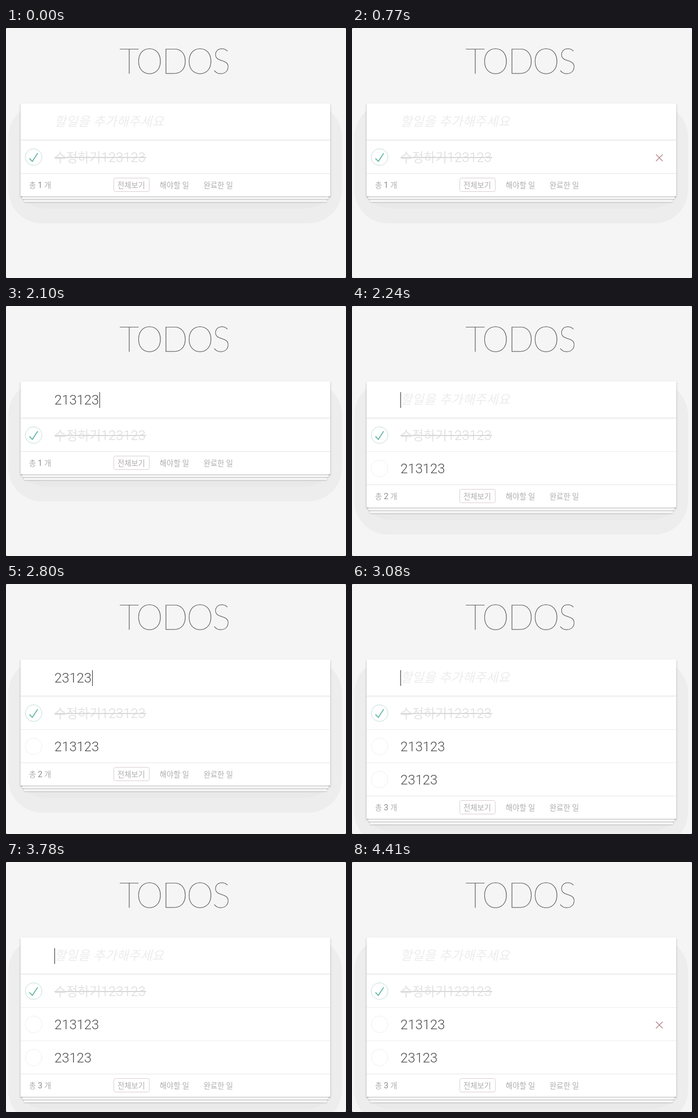
Recreate the animation shown at these times as an HTML page. Size 604 px wide and 444 px high, loop 4.55 s.

```html
<!DOCTYPE html>
<html lang="ko">
<head>
<meta charset="utf-8">
<title>TODOS</title>
<style>
html, body { margin: 0; width: 100%; height: 100%; overflow: hidden; background: #555; }
#stage { position: relative; width: 604px; height: 444px; overflow: hidden; background: #f5f5f5; border-radius: 2px; }
#glow, #glow::after, #card, svg { position: absolute; }
#glow { left: 4px; top: 134px; width: 593px; border-radius: 60px; background: #ededed; }
#glow::after { content: ""; inset: 60px 32px 26px; border-radius: 0 0 40px 40px / 0 0 16px 16px; background: #e9e9e9; }
#card {
  left: 26px; top: 134px; width: 550px; background: #fff;
  box-shadow: 0 1px 1px rgba(0,0,0,.2), 0 8px 0 -3px #f6f6f6, 0 9px 1px -3px rgba(0,0,0,.2),
    0 16px 0 -6px #f6f6f6, 0 17px 2px -6px rgba(0,0,0,.2), 0 2px 4px rgba(0,0,0,.2);
}
#head { height: 65px; box-shadow: inset 0 -2px 1px rgba(0,0,0,.03); }
svg { left: 0; top: 0; }
text { font-family: Roboto, "Noto Sans CJK KR", "Noto Sans CJK", sans-serif; white-space: pre; }
#title {
  font: 100 61px Lato, Inter, sans-serif; letter-spacing: -2.2px; text-anchor: middle;
  fill: #4d4d4d; stroke: #4d4d4d; stroke-width: .25px;
}
#hint { font: italic 100 22.7px "Noto Sans CJK KR", "Noto Sans CJK", sans-serif; fill: #ececec; }
.entry { font-size: 23.8px; font-weight: 300; fill: #4d4d4d; }
.done { fill: #d9d9d9; }
.ko { font-size: 22.5px; fill: #e2e2e2; }
#foot text { font-size: 13.3px; font-weight: 300; fill: #adadad; }
#count { font-size: 14.5px; font-weight: 400; fill: #8a8a8a; }
</style>
</head>
<body>
<div id="stage">
  <div id="glow"></div>
  <div id="card"><div id="head"></div></div>
  <svg width="604" height="444" viewBox="0 0 604 444">
    <text id="title" x="299" y="80.5">TODOS</text>
    <text id="hint" x="86" y="174">할일을 추가해주세요</text>
    <text id="field" class="entry" x="86" y="175"></text>
    <rect id="caret" y="153" width="1" height="28" fill="#333"/>
    <rect x="26" y="199" width="550" height="1" fill="#e6e6e6"/>
    <g id="rows"></g>
    <g id="foot">
      <rect x="26" width="550" height="1" fill="#e6e6e6"/>
      <text x="41" y="26">총 <tspan id="count"></tspan> 개</text>
      <rect x="191.5" y="8.5" width="63" height="24" rx="3" fill="none" stroke="#dccfd0"/>
      <text x="198" y="26">전체보기</text>
      <text x="273" y="26">해야할 일</text>
      <text x="351" y="26">완료한 일</text>
    </g>
    <path id="cross" d="M-6 -6L6 6M6 -6L-6 6" fill="none" stroke="#b07f83" stroke-width="1.1"/>
  </svg>
</div>
<script>
const LOOP = 4550, ROW = 59, LEFT = 86, DIGIT = 13.36;
const $ = id => document.getElementById(id);

// start time, row count, typed text, caret shown, row under the pointer (-1 for none)
const steps = [
  [0, 1, '', false, -1],
  [770, 1, '', false, 0],
  [1260, 1, '', false, -1],
  [1400, 1, '', true, -1],
  [1540, 1, '21', true, -1],
  [1680, 1, '213', true, -1],
  [1820, 1, '21312', true, -1],
  [1890, 1, '213123', true, -1],
  [2240, 2, '', true, -1],
  [2450, 2, '2', true, -1],
  [2520, 2, '23', true, -1],
  [2590, 2, '231', true, -1],
  [2660, 2, '2312', true, -1],
  [2730, 2, '23123', true, -1],
  [3080, 3, '', true, -1],
  [3290, 3, '', false, -1],
  [3500, 0, '', false, -1],
  [3640, 0, '', true, -1],
  [3780, 3, '', true, -1],
  [4130, 3, '', false, -1],
  [4410, 3, '', false, 1]
];

const items = [
  { label: '<tspan class="ko">수정하기</tspan>123123', done: true },
  { label: '213123' },
  { label: '23123' }
];

const rowMarkup = ({ label, done }, i) => `
  <g transform="translate(0 ${200 + ROW * i})">
    <g transform="translate(34.2 14.5) scale(.2963)">
      <circle cx="50" cy="50" r="50" fill="none" stroke="${done ? '#bddad5' : '#ededed'}" stroke-width="3"/>
      ${done ? '<path fill="#62b5a4" d="M72 25L42 71 27 56l-4 4 20 20 34-52z"/>' : ''}
    </g>
    <text class="entry ${done ? 'done' : ''}" x="${LEFT}" y="38">${label}</text>
    ${done ? `<rect x="${LEFT}" y="29" width="163" height="2" fill="#d9d9d9"/>` : ''}
    <rect x="26" y="58" width="550" height="1" fill="#ededed"/>
  </g>`;

$('rows').innerHTML = items.map(rowMarkup).join('');
const rows = [...$('rows').children];
const show = (el, on) => { el.style.display = on ? '' : 'none'; };

function render([, count, typed, caret, hover]) {
  const top = 200 + ROW * count - (count ? 1 : 0);
  $('card').style.height = top + 41 - 134 + 'px';
  $('glow').style.height = top + 89 - 134 + 'px';
  $('foot').setAttribute('transform', `translate(0 ${top})`);
  $('count').textContent = count;
  rows.forEach((row, i) => show(row, i < count));
  show($('hint'), !typed);
  $('field').textContent = typed;
  show($('caret'), caret);
  $('caret').setAttribute('x', Math.round(LEFT + DIGIT * typed.length));
  show($('cross'), hover >= 0);
  $('cross').setAttribute('transform', `translate(546 ${230.5 + ROW * hover})`);
}

let current;
const start = performance.now();

function tick() {
  const t = (performance.now() - start) % LOOP;
  const step = steps.findLast(s => s[0] <= t);
  if (step !== current) render(current = step);
  requestAnimationFrame(tick);
}
tick();
</script>
</body>
</html>
```
